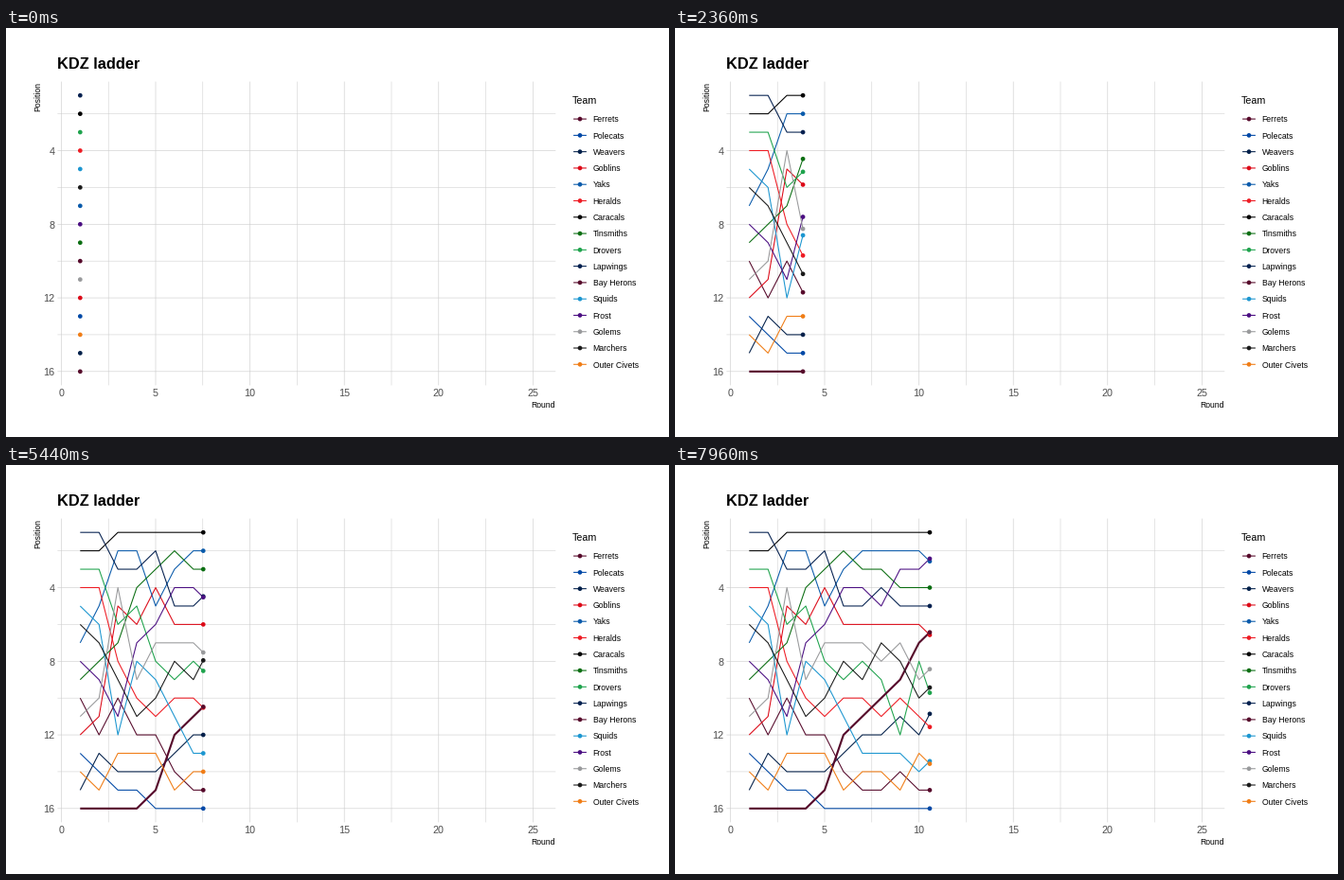
Write a matplotlib script that moves like this. It is 700x432 px and loops after 8 s.

```python
import numpy as np
import matplotlib.pyplot as plt
from matplotlib.animation import FuncAnimation

W, H, DPI = 700, 432, 100
PX = 72 / DPI                     # one pixel in points
FRAMES, INTERVAL = 200, 40
PER_ROUND = 499 / 24              # mean frames per round

# panel edges in pixels
LEFT, RIGHT, TOP, BOTTOM = 54.4, 580.3, 56.6, 377.4
GRID = "#cccccc"
TICK = "#4d4d4d"

# key letter, legend name, colour
TEAMS = [
    ("F", "Ferrets", "#560a2b"),
    ("P", "Polecats", "#0048a6"),
    ("W", "Weavers", "#03204a"),
    ("G", "Goblins", "#dc0a18"),
    ("Y", "Yaks", "#0a5bab"),
    ("H", "Heralds", "#ee1c24"),
    ("C", "Caracals", "#000000"),
    ("T", "Tinsmiths", "#0b6e12"),
    ("D", "Drovers", "#1fa34d"),
    ("L", "Lapwings", "#04204f"),
    ("B", "Bay Herons", "#560a2b"),
    ("S", "Squids", "#1c96d0"),
    ("R", "Frost", "#4b0f82"),
    ("O", "Golems", "#999a9c"),
    ("M", "Marchers", "#1a1a1a"),
    ("V", "Outer Civets", "#f07d16"),
]
BOLD_TEAM = "B"
COLORS = {key: color for key, _, color in TEAMS}

# ladder order after each round, first place to last
LADDER = [
    "LCDHSMYRTFOGPVWB",
    "LCDHYSMTROGFWPVB",
    "CYLOGDTHMFRSVWPB",
    "CYLTDGRSOHMFVWPB",
    "CLTGYRODSMHFVWBP",
    "CTYRLGOMDHSBWFVP",
    "CYTRLGODMHBWSVFP",
    "CYTLRGMODBHWSVFP",
    "CYRTLGOMBHWDSFVP",
    "CYRTLGBDOMHWVSFP",
    "CRYTLBGOMWDHSVFP",
]
ROUNDS = np.arange(1, len(LADDER) + 1)
# each round is reached on a whole frame
ARRIVE = np.round((ROUNDS - 1) * PER_ROUND)
RANKS = {key: np.array([order.index(key) + 1 for order in LADDER])
         for key in COLORS}


def px_x(rnd):
    return LEFT + (np.asarray(rnd) + 0.2) / 26.4 * (RIGHT - LEFT)


def px_y(pos):
    return TOP + (np.asarray(pos) - 0.25) / 16.5 * (BOTTOM - TOP)


plt.rcParams["font.family"] = "Liberation Sans"
plt.rcParams["path.snap"] = False
fig = plt.figure(figsize=(W / DPI, H / DPI), dpi=DPI, facecolor="white")
ax = fig.add_axes([0, 0, 1, 1])
ax.set_xlim(0, W)
ax.set_ylim(H, 0)
ax.axis("off")


def label(x, y, text, size, **kw):
    return ax.text(x, y, text, fontsize=size * PX, va="baseline", **kw)


def stroke(xs, ys, color, width, z):
    line, = ax.plot(xs, ys, color=color, lw=width * PX, zorder=z,
                    solid_capstyle="butt", solid_joinstyle="round")
    return line


def dots(xs, ys, colors, z):
    return ax.scatter(xs, ys, s=(4.7 * PX) ** 2, c=colors, linewidths=0,
                      zorder=z)


def draw_frame():
    for i in range(11):
        x = px_x(2.5 * i)
        major = i % 2 == 0
        stroke([x, x], [TOP, BOTTOM], GRID, 0.6 if major else 0.5, 0.5)
        if major:
            label(x, 389, str(i * 5 // 2), 10.8, ha="center", color=TICK)
    for pos in range(2, 17, 2):
        y = px_y(pos)
        major = pos % 4 == 0
        stroke([LEFT, RIGHT], [y, y], GRID, 0.6 if major else 0.5, 0.5)
        if major:
            label(51.7, y + 4.4, str(pos), 10.8, ha="right", color=TICK)
    label(54, 43, "KDZ ladder", 16.4, weight="bold")
    label(36.2, 56.6, "Position", 8.6, rotation=90, ha="right",
          rotation_mode="anchor")
    label(580, 401, "Round", 8.6, ha="right")


def draw_legend():
    label(597.3, 80, "Team", 10.6)
    ys = 96.1 + 17.28 * np.arange(len(TEAMS))
    for y, (_, name, color) in zip(ys, TEAMS):
        stroke([599.1, 612.9], [y, y], color, 1.07, 2)
        label(619.5, y + 3.2, name, 8.6)
    dots(np.full(len(ys), 606), ys, list(COLORS.values()), 3)


draw_frame()
draw_legend()

lines = {key: stroke([], [], color, 2.13 if key == BOLD_TEAM else 1.07, 2)
         for key, color in COLORS.items()}
heads = dots(np.zeros(len(TEAMS)), np.zeros(len(TEAMS)),
             [COLORS[key] for key in LADDER[0]], 4)


def update(frame):
    now = np.interp(frame, ARRIVE, ROUNDS)
    done = ROUNDS <= now
    xs = px_x(np.append(ROUNDS[done], now))
    tips = []
    for key in LADDER[0]:
        ranks = RANKS[key]
        ys = px_y(np.append(ranks[done], np.interp(now, ROUNDS, ranks)))
        lines[key].set_data(xs, ys)
        lines[key].set_visible(frame > 0)
        tips.append((xs[-1], ys[-1]))
    heads.set_offsets(tips)
    return [*lines.values(), heads]


anim = FuncAnimation(fig, update, frames=FRAMES, interval=INTERVAL,
                     init_func=lambda: update(0), repeat=True, repeat_delay=0)
plt.show()
```
